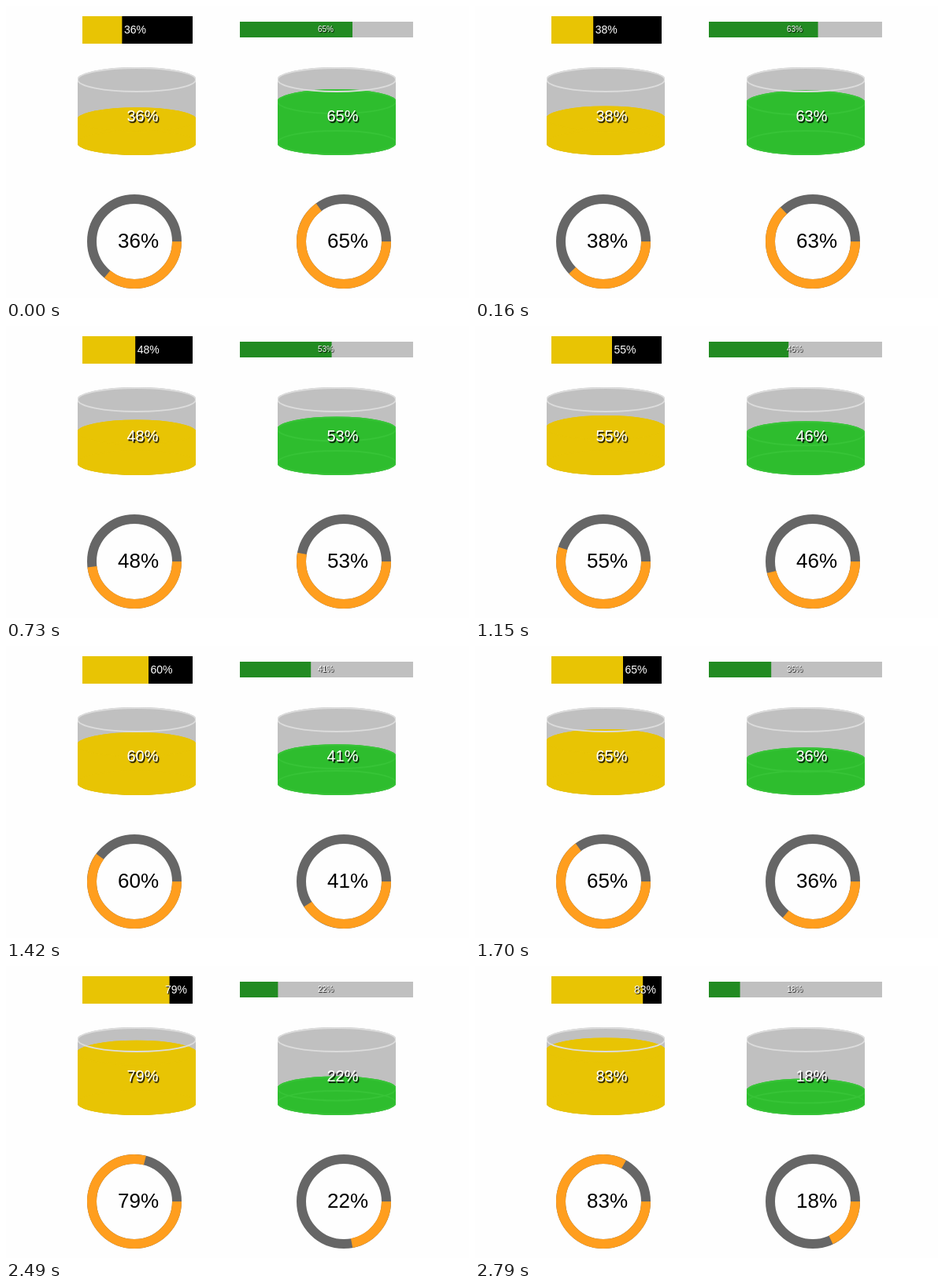
Write an HTML page that moves like this. It is 588 by 372 pixels and loops after 2.89 s.

```html
<!DOCTYPE html>
<html lang="en">
<head>
<meta charset="utf-8">
<title>Progress gauges</title>
<style>
  html, body { margin: 0; width: 100%; height: 100%; overflow: hidden; background: #fefefe; }
  svg { display: block; }
  #stage { position: absolute; left: 0; top: 0; }
  .label {
    position: absolute; white-space: nowrap; color: #fff;
    font-family: "Liberation Sans", Arial, sans-serif;
  }
  .bar { font-size: 14px; line-height: 16px; top: 22px; text-shadow: 1px 1px 1px #000; }
  .thin { font-size: 10px; line-height: 11px; top: 24px; text-shadow: 1px 1px 1px #000; }
  .tank { font-size: 20px; line-height: 22px; top: 129px; text-shadow: 1.5px 1.5px 1px #000; }
  .ring { font-size: 26px; line-height: 30px; top: 284px; color: #000; }
</style>
</head>
<body>
<svg id="stage" width="588" height="372" viewBox="0 0 588 372"></svg>
<script>
const LOOP = 2890;
// [start in ms, left percentage]; the right side shows 101 minus it
const STEPS = [
  [0, 36], [160, 38], [310, 41], [460, 43], [610, 46], [730, 48], [880, 50],
  [1000, 52], [1150, 55], [1270, 57], [1420, 60], [1540, 62], [1700, 65],
  [1850, 68], [1980, 70], [2100, 72], [2250, 75], [2370, 77], [2490, 79],
  [2640, 81], [2790, 83]
];
const TOP = 94, DEPTH = 80, RX = 75, RY = 15;
const stage = document.getElementById('stage');

function add(parent, tag, attrs) {
  const el = document.createElementNS('http://www.w3.org/2000/svg', tag);
  for (const k in attrs) el.setAttribute(k, attrs[k]);
  parent.append(el);
  return el;
}

function label(kind, x) {
  const el = document.createElement('div');
  el.className = 'label ' + kind;
  el.style.left = x + 'px';
  document.body.append(el);
  return el;
}

function bar(kind, x, y, width, height, back, color, place) {
  add(stage, 'rect', { x, y, width, height, fill: back });
  const fill = add(stage, 'rect', { x, y, height, fill: color });
  const text = label(kind, x);
  return p => {
    const w = width * p / 100;
    fill.setAttribute('width', w);
    text.style.left = place(x + w) + 'px';
    text.textContent = p + '%';
  };
}

function drum(y) {
  return `M0 ${y}a${RX} ${RY} 0 0 1 150 0V${TOP + DEPTH}a${RX} ${RY} 0 0 1 -150 0Z`;
}

function tank(x, color, edge) {
  const box = add(stage, 'svg', { x, y: 0, width: 150, height: 372, overflow: 'hidden' });
  const solid = c => ({ fill: c, stroke: c, 'stroke-width': 2 });
  const rim = (cy, stroke) => add(box, 'ellipse',
    { cx: RX, cy, rx: RX, ry: RY, fill: 'none', stroke, 'stroke-width': 2 });
  add(box, 'path', { d: drum(TOP), ...solid('#c0c0c0') });
  const liquid = add(box, 'path', solid(color));
  rim(TOP + DEPTH, edge);
  const surface = rim(TOP, edge);
  rim(TOP, '#dcdcdc');
  const text = label('tank', x + 62.5);
  return p => {
    const y = TOP + DEPTH * (1 - p / 100);
    liquid.setAttribute('d', drum(y));
    surface.setAttribute('cy', y);
    text.textContent = p + '%';
  };
}

function ring(cx) {
  const circle = stroke => add(stage, 'circle',
    { cx, cy: 300, r: 54, fill: 'none', stroke, 'stroke-width': 12, pathLength: 100 });
  circle('#666');
  const arc = circle('#ff9e1e');
  const text = label('ring', cx - 21);
  return p => {
    arc.setAttribute('stroke-dasharray', p + ' 100');
    text.textContent = p + '%';
  };
}

const left = [
  bar('bar', 97, 13, 140, 35, '#000', '#e8c404', end => Math.min(end + 2.5, 202)),
  tank(91, '#e8c404', '#e8c404'),
  ring(163)
];
const right = [
  bar('thin', 297, 20, 220, 20, '#c0c0c0', '#228b22', () => 396),
  tank(345, '#2ebd2e', '#37c437'),
  ring(429)
];

let shown;
function draw(now) {
  const t = now % LOOP;
  const p = STEPS.filter(s => s[0] <= t).pop()[1];
  if (p !== shown) {
    left.forEach(set => set(p));
    right.forEach(set => set(101 - p));
    shown = p;
  }
}

const start = performance.now();
function tick() {
  draw(Math.max(0, performance.now() - start));
  requestAnimationFrame(tick);
}
tick();
</script>
</body>
</html>
```
